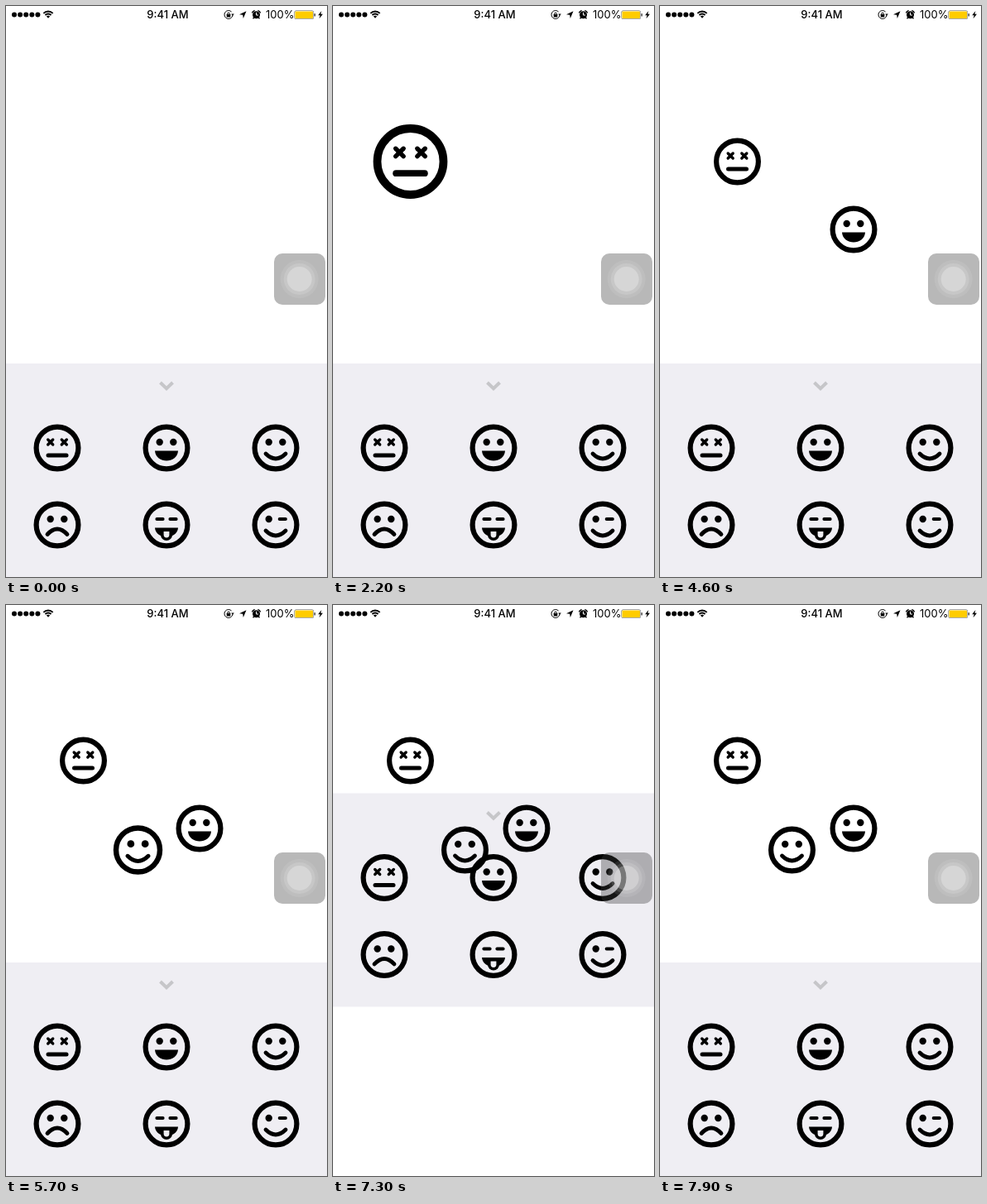
These frames come from a looping animation (388 px wide and 690 px high, 8000 ms). An HTML page with a canvas:

```html
<!DOCTYPE html>
<html lang="en">
<head>
<meta charset="utf-8">
<title>Smiley tray</title>
<style>
html, body { margin: 0; width: 100%; height: 100%; overflow: hidden; background: #fff; }
canvas { display: block; }
</style>
</head>
<body>
<canvas id="stage" width="388" height="690"></canvas>
<script>
const ctx = document.getElementById('stage').getContext('2d');
const LOOP = 8000, STEP = 100, SCALE_TIME = 400;
const TRAY = '#efeef3', TRAY_TOP = 432, TRAY_HEIGHT = 258;

const clamp = p => Math.max(0, Math.min(1, p));
const mix = (a, b, p) => a + (b - a) * p;
const smooth = p => p * p * (3 - 2 * p);
const easeOut = p => 1 - (1 - p) ** 2;

function dot(x, y, r, color = '#000') {
  ctx.fillStyle = color;
  ctx.beginPath();
  ctx.arc(x, y, r, 0, 7);
  ctx.fill();
}

function ring(x, y, r, width, from = 0, to = Math.PI * 2) {
  ctx.lineWidth = width;
  ctx.beginPath();
  ctx.arc(x, y, r, from, to);
  ctx.stroke();
}

function line(width, ...points) {
  ctx.lineWidth = width;
  ctx.beginPath();
  for (let i = 0; i < points.length; i += 2) ctx.lineTo(points[i], points[i + 1]);
  ctx.stroke();
}

function polygon(color, ...points) {
  ctx.fillStyle = color;
  ctx.beginPath();
  for (let i = 0; i < points.length; i += 2) ctx.lineTo(points[i], points[i + 1]);
  ctx.fill();
}

function box(x, y, w, h, r, color) {
  ctx.fillStyle = color;
  ctx.beginPath();
  ctx.roundRect(x, y, w, h, r);
  ctx.fill();
}

// Face parts, relative to the face centre.
const eye = x => dot(x, -7, 4.2);
const eyes = () => { eye(-8.3); eye(8.3); };
const dash = x => line(4, x - 3.6, -7, x + 3.6, -7);
const cross = x => {
  line(3.4, x - 3, -10, x + 3, -4);
  line(3.4, x + 3, -10, x - 3, -4);
};

function curve(ends, middle) {
  ctx.lineWidth = 4.8;
  ctx.beginPath();
  ctx.moveTo(-12, ends);
  ctx.quadraticCurveTo(0, 2 * middle - ends, 12, ends);
  ctx.stroke();
}

function openMouth(top, height) {
  ctx.fillStyle = '#000';
  ctx.beginPath();
  ctx.moveTo(-14, top);
  ctx.lineTo(14, top);
  ctx.bezierCurveTo(13, top + height * 1.33, -13, top + height * 1.33, -14, top);
  ctx.fill();
}

const moods = {
  dead() { cross(-8.3); cross(8.3); line(5, -11, 9, 11, 9); },
  grin() { eyes(); openMouth(3.5, 12); },
  smile() { eyes(); curve(7, 13); },
  sad() { eyes(); curve(11.5, 5); },
  tongue() {
    dash(-8); dash(8);
    openMouth(3.5, 11);
    box(-7, 5, 14, 14, [0, 0, 7, 7], '#000');
    box(-3.4, 8, 6.8, 7.5, [0, 0, 3.4, 3.4], TRAY);
  },
  wink() { eye(-8.3); dash(8.3); curve(7, 13); }
};

function face(mood, x, y, scale = 1) {
  ctx.save();
  ctx.translate(x, y);
  ctx.scale(scale, scale);
  ctx.strokeStyle = '#000';
  ctx.lineCap = 'round';
  ring(0, 0, 25.4, 6.2);
  moods[mood]();
  ctx.restore();
}

function tray(lift) {
  ctx.save();
  ctx.translate(0, -lift);
  ctx.fillStyle = TRAY;
  ctx.fillRect(0, TRAY_TOP, 388, TRAY_HEIGHT);
  ctx.strokeStyle = '#c6c6c9';
  ctx.lineCap = 'butt';
  line(4, 186.5, 455, 194, 462.3, 201.5, 455);
  Object.keys(moods).forEach((mood, i) =>
    face(mood, 62 + 132 * (i % 3), 534 + 93 * Math.floor(i / 3)));
  ctx.restore();
}

const drags = [
  { mood: 'dead', start: 1600, drop: 2020, from: [55.5, 370.5], to: [93.5, 188], bulge: 0 },
  { mood: 'grin', start: 3300, drop: 3990, from: [192.5, 418], to: [234, 270], bulge: 14 },
  { mood: 'smile', start: 4800, drop: 5350, from: [289, 449], to: [159.5, 296], bulge: 0 }
];

function draggedFace(d, t) {
  if (t < d.start) return;
  const p = clamp((t - d.start) / (d.drop - d.start));
  const moved = easeOut(p);
  const grow = smooth(clamp((t - d.start + 80) / SCALE_TIME));
  const shrink = smooth(clamp((t - d.drop) / SCALE_TIME));
  face(d.mood,
    mix(d.from[0], d.to[0], moved) + d.bulge * Math.sin(Math.PI * p),
    mix(d.from[1], d.to[1], moved),
    1 + grow * (1 - shrink));
}

// The tray is pulled up, then let go.
function trayLift(t) {
  const up = smooth(clamp((t - 7050) / 420));
  const back = smooth(clamp((t - 7500) / 380));
  return 319 * up * (1 - back);
}

function text(string, x, weight) {
  ctx.font = `${weight} 13px Inter, sans-serif`;
  ctx.fillText(string, x, 15.2);
}

function statusBar() {
  ctx.strokeStyle = '#000';
  ctx.lineCap = 'butt';
  for (let i = 0; i < 5; i++) dot(10 + 7.1 * i, 10.5, 3);

  const a = -Math.PI * 0.75, b = -Math.PI * 0.25;
  ring(51, 14.5, 8, 1.9, a, b);
  ring(51, 14.5, 5, 1.9, a, b);
  polygon('#000', 51, 14.8, 48.8, 12.4, 51, 11.4, 53.2, 12.4);

  ctx.textAlign = 'center';
  text('9:41 AM', 195.5, 500);
  ctx.textAlign = 'left';
  text('100%', 314, 400);

  // Rotation lock
  ring(269, 10.5, 5, 1, -0.1, 5.5);
  box(266.7, 9.8, 4.6, 3.6, 0.5, '#000');
  ring(269, 9.6, 1.5, 0.9, Math.PI, 0);
  polygon('#000', 272.2, 9.4, 275.8, 9.4, 274, 11.7);

  // Location arrow
  polygon('#000', 290.5, 6.2, 286.8, 15, 286.2, 10.8, 282, 10.2);

  // Alarm clock
  dot(302.5, 10.8, 4.5);
  ring(302.5, 10.8, 5.7, 1.3, -2.7, -1.9);
  ring(302.5, 10.8, 5.7, 1.3, -1.24, -0.44);
  line(1.4, 299.6, 13.8, 298.6, 15.4);
  line(1.4, 305.4, 13.8, 306.4, 15.4);
  ctx.strokeStyle = '#fff';
  line(1, 302.5, 7.8, 302.5, 11, 305, 11);

  // Battery
  box(348.5, 5.5, 23.5, 10.5, 2, '#555');
  box(349, 6, 22.5, 9.5, 1.6, '#fff');
  box(349.5, 6.5, 21.5, 8.5, 1, '#fc0');
  box(372.5, 9, 1.4, 3.6, 0.7, '#333');
  polygon('#000', 381.4, 6, 377.2, 11.3, 379.7, 11.3, 378.6, 15.2, 383, 9.7, 380.4, 9.7);
}

function touchButton() {
  box(324, 299, 62, 62, 10, 'rgba(60,60,60,.36)');
  dot(354.7, 330, 23, 'rgba(255,255,255,.09)');
  dot(354.7, 330, 19, 'rgba(255,255,255,.13)');
  dot(354.7, 330, 15, 'rgba(255,255,255,.27)');
}

function draw(t) {
  ctx.fillStyle = '#fff';
  ctx.fillRect(0, 0, 388, 690);
  tray(trayLift(t));
  drags.forEach(d => draggedFace(d, t));
  statusBar();
  touchButton();
}

const begin = performance.now();
function tick() {
  const t = (performance.now() - begin) % LOOP;
  draw(Math.floor(t / STEP) * STEP);
  requestAnimationFrame(tick);
}
tick();
</script>
</body>
</html>
```
